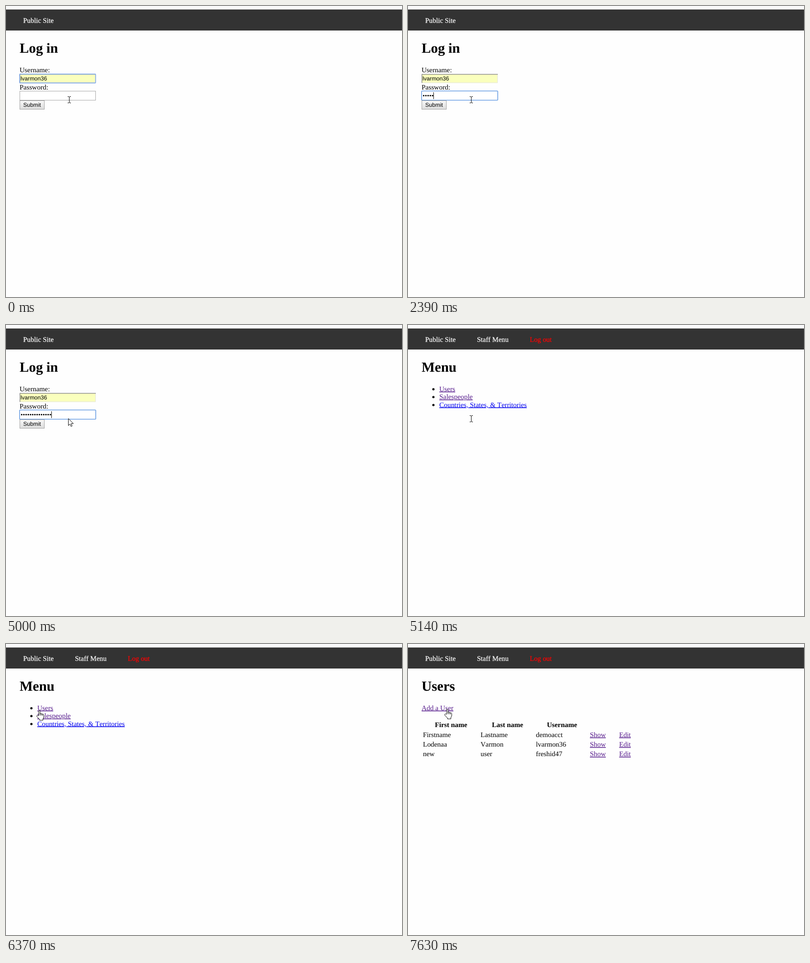
Animation, 873 px wide and 641 px high, one loop 8000 ms. Source, as an HTML page:

```html
<!DOCTYPE html>
<html lang="en">
<head>
<meta charset="utf-8">
<title>Staff login</title>
<style>
  html, body { margin: 0; width: 100%; height: 100%; overflow: hidden; background: #fefefe; }
  svg { display: block; width: 873px; height: 641px; }
  text { font: 15.4px "Liberation Serif", "Times New Roman", serif; font-kerning: none; text-rendering: geometricPrecision; }
  .h1 { font-size: 30.8px; font-weight: bold; }
  .th { font-weight: bold; text-anchor: middle; }
  .ui { font: 12.5px "Liberation Sans", Arial, sans-serif; }
  .nav { fill: #fff; stroke: #fff; stroke-width: .25px; }
  .out { fill: #f00; stroke: #f00; stroke-width: .25px; }
  .link { fill: #00e; }
  .seen { fill: #551a8b; }
  .link, .seen { text-decoration: underline; text-decoration-skip-ink: none; }
</style>
</head>
<body>
<svg viewBox="0 0 873 641">
  <defs>
    <linearGradient id="face" x2="0" y2="1">
      <stop stop-color="#f8f8f8"/><stop offset="1" stop-color="#dcdcdc"/>
    </linearGradient>
  </defs>
  <rect width="873" height="641" fill="#fefefe"/>
  <rect width="873" height="8" fill="#fbfbfc"/>
  <rect y="7.7" width="873" height="46.3" fill="#333"/>
  <g id="pages"></g>
  <g id="cursors" stroke="#000" fill="#fff" stroke-linejoin="round">
    <path id="ibeam" fill="none" d="M-3 .5H-1L.5 1.5 2 .5H4M.5 1.5V13.5M-3 14.5H-1L.5 13.5 2 14.5H4"/>
    <path id="arrow" d="M.5 1V16.5L4 13.2 6.4 18.5 8.8 17.4 6.5 12.2H11.5Z"/>
    <path id="hand" d="M5 12.5V2.5Q5 1 6.5 1T8 2.5V8.5Q8 7 9.3 7.2T10.8 9Q11 7.8 12.2 8T13.6 9.7Q14 8.8 15 9.1T16.4 11V15.5L14.5 19.5V22.5H7V20.5L1.2 14.5Q.2 13 1.3 12T3.5 11.8ZM8 8.5V12M10.8 9V12M13.6 9.7V12.5"/>
  </g>
</svg>
<script>
const LOOP = 8000;
const $ = id => document.getElementById(id);
const show = (id, on) => { $(id).style.display = on ? "" : "none"; };
const text = (x, y, label, cls = "") => `<text x="${x}" y="${y}" class="${cls}">${label}</text>`;
const group = (id, body) => `<g id="${id}">${body}</g>`;
const box = (x, y, w, h, stroke, fill = "none", more = "") =>
  `<rect x="${x}" y="${y}" width="${w}" height="${h}" stroke="${stroke}" fill="${fill}" ${more}/>`;
const line = (d, color, width = 1) => `<path d="${d}" fill="none" stroke="${color}" stroke-width="${width}"/>`;

const keyTimes = [1560, 1830, 2110, 2260, 2390, 2530, 3130, 3440, 3590, 3730, 3860, 4310, 4720, 4850];
const dotPitch = 4.86;
const account = "lvarmon36";

// [start, cursor, x, y], each held until the next
const cursorSteps = [
  [0, "ibeam", 139, 199], [5000, "arrow", 137, 205], [5140, "ibeam", 139, 199],
  [5830, "arrow", 98, 188], [5960, "arrow", 37, 144], [6100, "arrow", 48, 142],
  [6230, "arrow", 64, 145], [6370, "hand", 67, 145.5], [6520, "hand", 68, 145.5],
  [6770, "hand", 88, 135.5], [7040, "hand", 68, 145.5], [7480, "hand", 79, 142.5],
  [7630, "hand", 80, 142.5]
];

const dots = keyTimes.map((_, i) =>
  `<circle id="dot${i}" cx="${34.6 + i * dotPitch}" cy="197.4" r="1.65"/>`).join("");

const login = text(30, 103, "Log in", "h1") +
  text(30, 145.5, "Username:") + text(30, 183.5, "Password:") +
  `<rect x="30" y="150" width="168" height="19.5" fill="#faffbd"/>` +
  line("M30 169H197.5V150", "#e3e3e3") +
  line("M30.7 169.5V150.5H198", "#8a8a8a", 1.5) +
  text(32, 164, account, "ui") +
  group("userFocus", box(30, 150, 167.5, 19.5, "#86ace6", "none", 'stroke-width="1.8" rx="1"')) +
  group("passIdle", box(30.5, 187.5, 167, 20, "#a5a5a5", "#fff")) +
  group("passFocus", box(30, 187.3, 167.8, 20.2, "#659be2", "#fff", 'stroke-width="1.6" rx="1"')) +
  dots + `<rect id="caret" y="190" width="1" height="15"/>` +
  box(30.5, 208.5, 54, 19, "#a0a0a0", "url(#face)") + text(38, 222, "Submit", "ui");

const menu = text(30, 103, "Menu", "h1") +
  [["Users", "seen"], ["Salespeople", "seen"], ["Countries, States, &amp; Territories", "link"]]
    .map(([label, cls], i) => `<circle cx="56" cy="${141.4 + i * 17.4}" r="2.5"/>` +
      text(69, 145.7 + i * 17.4, label, cls)).join("");

const columns = [33, 160, 282, 401, 465.5];
const people = [
  ["Firstname", "Lastname", "demoacct"],
  ["Lodenaa", "Varmon", account],
  ["new", "user", "freshid47"]
];
const users = text(30, 103, "Users", "h1") + text(30, 145.7, "Add a User", "seen") +
  text(95, 183, "First name", "th") + text(219.5, 183, "Last name", "th") + text(339.5, 183, "Username", "th") +
  people.map((person, row) => [...person, "Show", "Edit"].map((label, col) =>
    text(columns[col], 204.8 + row * 21.3, label, col > 2 ? "seen" : "")).join("")).join("");

$("pages").innerHTML = text(38, 37, "Public Site", "nav") +
  group("staffNav", text(152, 37, "Staff Menu", "nav") + text(268.5, 37, "Log out", "out")) +
  group("login", login) + group("menu", menu) + group("users", users);

function render(t) {
  show("login", t < 5140);
  show("staffNav", t >= 5140);
  show("menu", t >= 5140 && t < 7040);
  show("users", t >= 7040);

  const passwordActive = t >= 270;
  show("userFocus", !passwordActive);
  show("passIdle", !passwordActive);
  show("passFocus", passwordActive);

  const typed = keyTimes.filter(time => time <= t).length;
  keyTimes.forEach((_, i) => show("dot" + i, i < typed));
  show("caret", passwordActive && !(t >= 840 && t < 1270));
  $("caret").setAttribute("x", Math.round(32 + typed * dotPitch));

  const [, cursor, x, y] = cursorSteps.findLast(step => step[0] <= t);
  for (const id of ["ibeam", "arrow", "hand"]) show(id, id === cursor);
  $("cursors").setAttribute("transform", `translate(${x} ${y})`);
}

const start = performance.now();
function tick() {
  render((performance.now() - start) % LOOP);
  requestAnimationFrame(tick);
}
tick();
</script>
</body>
</html>
```
